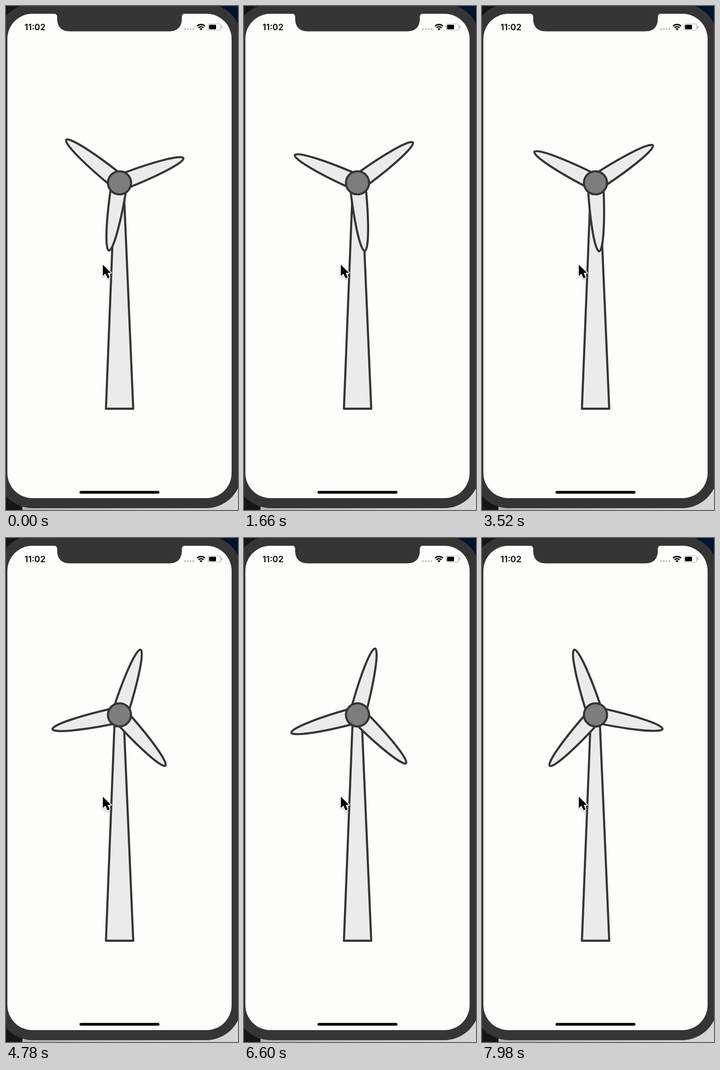
These frames come from a looping animation (508x1103 px, 8000 ms). An HTML page:

```html
<!DOCTYPE html>
<html lang="en">
<head>
<meta charset="utf-8">
<title>Wind turbine</title>
<style>
  html, body { margin: 0; width: 100%; height: 100%; overflow: hidden; background: #353535; }
  svg { display: block; width: 508px; height: 1103px; }
  .line { fill: #ebebec; stroke: #353535; stroke-width: 4.6; stroke-linejoin: round; }
  .hub { fill: #7d7d7d; }
  .clock { font: 600 18.8px Inter, "Liberation Sans", sans-serif; }
</style>
</head>
<body>
<svg viewBox="0 0 508 1103">
  <defs>
    <linearGradient id="floor">
      <stop offset="0" stop-color="#b4b4b0"/>
      <stop offset="1" stop-color="#d6d6d4"/>
    </linearGradient>
    <filter id="soft" x="-50%" y="-50%" width="200%" height="200%">
      <feDropShadow dx="0" dy="1.5" stdDeviation="1.5" flood-opacity=".35"/>
    </filter>
    <path id="blade" class="line" d="M-17 0A17 150 0 0 1 17 0"/>
  </defs>

  <!-- desktop behind the phone -->
  <rect width="508" height="1103" fill="#161616"/>
  <rect x="440" width="68" height="90" fill="#04132e"/>
  <rect x="36" y="1040" width="472" height="63" fill="url(#floor)"/>

  <!-- phone -->
  <rect x="-19" y="-5" width="535" height="1104" rx="78" fill="#353535"/>
  <rect x="3" y="17" width="491" height="1060" rx="55" fill="#fdfdfc"/>
  <path fill="#353535" d="M105 16.5Q112 17 112 24V27Q112 55.5 140 55.5H357Q385 55.5 385 27V24Q385 17 392 16.5Z"/>
  <rect x="161" y="1061.3" width="175" height="6" rx="3"/>

  <!-- status bar -->
  <text class="clock" x="40.5" y="53">11:02</text>
  <g fill="#c6c6c8">
    <rect x="390" y="48.6" width="4" height="4" rx="1"/>
    <rect x="396" y="48.6" width="4" height="4" rx="1"/>
    <rect x="402" y="48.6" width="4" height="4" rx="1"/>
    <rect x="408" y="48.6" width="4" height="4" rx="1"/>
  </g>
  <g fill="none" stroke="#000" stroke-width="2.9">
    <path d="M418.3 44A12.6 12.6 0 0 1 435.7 44"/>
    <path d="M421.5 47.6A8 8 0 0 1 432.5 47.6"/>
  </g>
  <path d="M427 53.2L423.8 50A4.6 4.6 0 0 1 430.2 50Z"/>
  <rect x="442.6" y="39" width="27.6" height="14" rx="3.8" fill="none" stroke="#a6a6a8" stroke-width="1.2"/>
  <rect x="444.6" y="41" width="15.4" height="10" rx="2"/>
  <path fill="#a6a6a8" d="M471.6 43.6Q474 44.4 474 46T471.6 48.4Z"/>

  <!-- turbine -->
  <path class="line" d="M218.8 881.4L237.4 412H258.4L278.6 881.4Z"/>
  <g transform="translate(248.5 387)">
    <g id="rotor">
      <use href="#blade"/>
      <use href="#blade" transform="rotate(120)"/>
      <use href="#blade" transform="rotate(240)"/>
    </g>
    <circle class="line hub" r="25.3"/>
  </g>

  <path d="M212 566V591L217.7 585.7L222.3 596L227 594L222.5 584H230Z" stroke="#fff" stroke-width="3.4"
        stroke-linejoin="round" paint-order="stroke" filter="url(#soft)"/>
</svg>
<script>
  const LOOP = 8000, BEAT = 140, STEP = 3, START = 68.9;
  const rotor = document.getElementById('rotor');

  // Each beat holds three poses, lasting 20, 100 and 20 ms.
  function pose(t) {
    const rest = t % BEAT;
    return 3 * Math.floor(t / BEAT) + (rest >= 20) + (rest >= 120);
  }

  function draw() {
    const t = performance.now() % LOOP;
    rotor.setAttribute('transform', `rotate(${START + STEP * pose(t)})`);
    requestAnimationFrame(draw);
  }
  draw();
</script>
</body>
</html>
```
